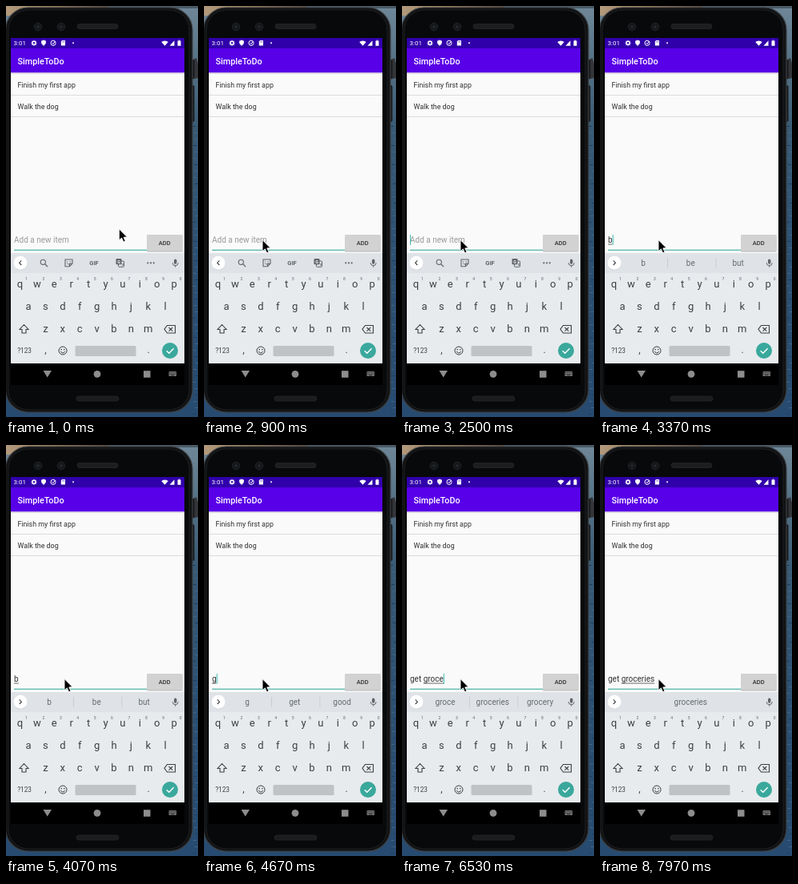
An HTML page with a canvas that plays this animation: 240 by 514 pixels, repeating every 8000 ms.

```html
<!DOCTYPE html>
<html lang="en">
<head>
<meta charset="utf-8">
<title>To-do list</title>
<style>
html, body { margin: 0; width: 100%; height: 100%; overflow: hidden; background: #08090a; }
canvas { display: block; width: 100vw; height: 100vh; }
</style>
</head>
<body>
<canvas id="stage"></canvas>
<script>
const W = 240, H = 514, LOOP = 8000;
const TEAL = '#3aa89c', INK = '#3c4043', GREY = '#60656a';
const canvas = document.getElementById('stage');
const c = canvas.getContext('2d');

// [time, text, composing start, suggestions]
const typing = [
  [0, '', 0, null],
  [3340, 'b', 0, ['b', 'be', 'but']],
  [4120, '', 0, null],
  [4640, 'g', 0, ['g', 'get', 'good']],
  [4870, 'ge', 0, ['ge', 'get', 'getting']],
  [5100, 'get', 0, ['get', 'getting', 'gets']],
  [5330, 'get ', 4, ['the', 'a', 'to']],
  [5570, 'get g', 4, ['g', 'going', 'good']],
  [5800, 'get gr', 4, ['gr', 'great', 'group']],
  [6030, 'get gro', 4, ['gro', 'group', 'grow']],
  [6270, 'get groc', 4, ['groc', 'grocery', 'groceries']],
  [6500, 'get groce', 4, ['groce', 'groceries', 'grocery']],
  [6740, 'get grocer', 4, ['grocer', 'grocery', 'groceries']],
  [6970, 'get groceri', 4, ['groceri', 'groceries', 'grocery']],
  [7200, 'get grocerie', 4, ['grocerie', 'groceries', 'grocery']],
  [7430, 'get groceries', 4, ['', 'groceries', '']]
];

function rect(x, y, w, h, fill) {
  c.fillStyle = fill;
  c.fillRect(x, y, w, h);
}
function round(x, y, w, h, r, fill, stroke, lw = 1) {
  c.beginPath();
  c.roundRect(x, y, w, h, r);
  paint(fill, stroke, lw);
}
function disc(x, y, r, fill, stroke, lw = 1) {
  c.beginPath();
  c.arc(x, y, r, 0, Math.PI * 2);
  paint(fill, stroke, lw);
}
function paint(fill, stroke, lw) {
  if (fill) { c.fillStyle = fill; c.fill(); }
  if (stroke) { c.strokeStyle = stroke; c.lineWidth = lw; c.stroke(); }
}
function shape(points, fill, stroke, lw = 1, open) {
  c.beginPath();
  points.forEach(([x, y], i) => i ? c.lineTo(x, y) : c.moveTo(x, y));
  if (!open) c.closePath();
  paint(fill, stroke, lw);
}
function text(s, x, y, size, fill, align = 'left', weight = 400) {
  c.font = `${weight} ${size}px Roboto, sans-serif`;
  c.textAlign = align;
  c.fillStyle = fill;
  c.fillText(s, x, y);
}
function fade(x0, y0, x1, y1, ...stops) {
  const g = c.createLinearGradient(x0, y0, x1, y1);
  stops.forEach(([p, col]) => g.addColorStop(p, col));
  return g;
}

function backdrop() {
  rect(0, 0, W, H, fade(0, 0, 0, H, [0, '#6f8798'], [.12, '#587487'], [.3, '#395a74'], [.6, '#2d5173'], [1, '#274b70']));
  rect(0, 0, 128, 12, fade(0, 0, 128, 0, [0, '#b39a7c'], [.5, '#92765a'], [1, '#594c42']));
  rect(128, 0, 112, 3, '#4a5a66');
  shape([[232, 68], [238, 65], [240, 72], [240, 90], [232, 92]], '#343539');
  // ripples
  for (let i = 0; i < 46; i++) {
    const y = 150 + i * 8, x = 233 + (i * 37 % 5);
    rect(x, y, 4, 1, i % 3 ? '#416685' : '#1c3d5e');
  }
}

function phone() {
  round(231, 67, 4.5, 24, 2, '#17181a');
  round(231, 99, 4.5, 46, 2, '#17181a');
  round(-.5, 2, 233.5, 506, 28, '#111214', '#3c3f42', 1.2);
  round(3, 5, 226, 500, 25, '#08090a', '#1d1f21', 1);
  disc(40, 26, 4.8, '#15171a', '#202327', 1);
  disc(40, 26, 1.8, '#25292e');
  disc(69, 26, 4.8, '#15171a', '#202327', 1);
  disc(69, 26, 1.8, '#25292e');
  round(89, 22.5, 51, 6, 3, '#1c1e20', '#292b2e', .7);
  round(88, 488, 53, 6, 3, '#1a1c1e', '#27292c', .7);
}

function statusBar() {
  rect(6, 40, 217, 13, '#3000aa');
  text('3:01', 9.5, 49.3, 8, '#fff');
  disc(35, 46.3, 2, null, '#fff', 1.5);
  for (let i = 0; i < 8; i++) {
    const a = i * Math.PI / 4;
    disc(35 + 3 * Math.cos(a), 46.3 + 3 * Math.sin(a), .6, '#fff');
  }
  shape([[47, 42.5], [50, 43.7], [49.7, 47], [47, 50], [44.3, 47], [44, 43.7]], '#fff');
  disc(59, 46.3, 3.1, null, '#fff', 1);
  shape([[57.5, 46], [59, 47.5], [61.5, 44]], null, '#fff', 1, true);
  shape([[70, 43], [74, 43], [74, 49.6], [68.8, 49.6], [68.8, 44.4]], '#fff');
  rect(70.5, 44, .7, 1.6, '#3000aa');
  rect(72, 44, .7, 1.6, '#3000aa');
  disc(84, 46.3, 1, '#fff');
  c.beginPath();
  c.moveTo(198.5, 49.8);
  c.arc(198.5, 49.8, 6.4, -2.3, -.84);
  paint('#fff');
  shape([[204.5, 49.7], [210.5, 49.7], [210.5, 43.3]], '#fff');
  rect(214.5, 43.5, 4, 6.3, '#fff');
  rect(215.7, 42.6, 1.6, 1, '#fff');
}

function app() {
  rect(6, 53, 217, 256, '#fafafa');
  rect(6, 53, 217, 30.5, '#5800e8');
  rect(6, 83.5, 217, 1.5, '#dddddf');
  text('SimpleToDo', 14.5, 72.5, 10.8, '#fff', 'left', 500);
  text('Finish my first app', 14.5, 101.5, 8.9, '#303030');
  text('Walk the dog', 14.5, 128.6, 8.9, '#303030');
  rect(6, 111, 217, 1, '#dcdcdc');
  rect(6, 138, 217, 1, '#dcdcdc');
  rect(10, 304.7, 166, 1.1, TEAL);
  round(176, 287, 44.5, 20.5, 1, '#b9b9b9');
  round(176, 286, 44.5, 20.5, 1, '#d2d2d2');
  text('ADD', 198.3, 299, 7.6, '#303030', 'center', 500);
}

function field(t, [since, value, from]) {
  text(value || 'Add a new item', 10, 296, 10, value ? '#333' : '#999');
  const end = 10 + (value ? c.measureText(value).width : 0);
  if (value) {
    const x = 10 + c.measureText(value.slice(0, from)).width;
    if (end > x + 1) rect(x, 297.6, end - x, .8, '#444');
  }
  const on = value ? (t - since) % 1000 < 500 : t % 1000 >= 400 && t % 1000 < 900;
  if (!on) return;
  if (value.length === 1) rect(end - .3, 286, 2, 12.5, '#8ed6d0');
  else rect(end, 286, 1.1, 13, '#4dbcb2');
}

function mic() {
  round(210, 316.5, 3.4, 6.2, 1.7, GREY);
  c.beginPath();
  c.arc(211.7, 321.2, 3.5, 0, Math.PI);
  paint(null, GREY, 1);
  rect(211.2, 324.5, 1, 2.2, GREY);
}

function toolIcons() {
  disc(46.3, 320.3, 3.1, null, GREY, 1.1);
  shape([[48.6, 322.6], [52, 326]], null, GREY, 1.3, true);
  shape([[74, 317], [83, 317], [83, 322], [79.5, 325.7], [74, 325.7]], null, GREY, 1.1);
  shape([[79.5, 325.7], [79.5, 322.2], [83, 322.2]], null, GREY, 1, true);
  disc(76.8, 319.7, .6, GREY);
  disc(80.2, 319.7, .6, GREY);
  c.beginPath();
  c.arc(78.3, 321, 2, .2, 2.9);
  paint(null, GREY, .9);
  text('GIF', 110, 324.2, 7.6, GREY, 'center', 700);
  round(140.5, 319, 7, 7.3, 1, '#dfe3e7', GREY, 1);
  round(137.5, 316, 7, 7.3, 1, GREY);
  text('G', 141, 321.9, 5.4, '#fff', 'center', 700);
  text('x', 145.8, 325.2, 4.5, GREY, 'center', 500);
  for (const x of [177.3, 181, 184.7]) disc(x, 321.3, 1.1, GREY);
}

function strip(words) {
  rect(6, 309, 217, 25, '#dfe3e7');
  disc(18, 321.8, 8.8, '#cfd3d7');
  disc(18, 321.2, 8.5, '#fff');
  const d = words ? 1 : -1;
  shape([[18 - 1.3 * d, 318.4], [18 + 1.4 * d, 321.2], [18 - 1.3 * d, 324]], null, INK, 1.1, true);
  mic();
  if (!words) return toolIcons();
  words.forEach((w, i) => text(w, 54 + i * 59.3, 324.8, 10, '#666b70', 'center'));
  if (words[0]) {
    rect(84, 315, .8, 13, '#c5c9cd');
    rect(144.5, 315, .8, 13, '#c5c9cd');
  }
}

function keyRow(letters, x, y) {
  [...letters].forEach((k, i) => text(k, x + i * 21.4, y, 13, INK, 'center'));
}

function keyboard() {
  rect(6, 334, 217, 113, '#e7ebee');
  keyRow('qwertyuiop', 17.5, 352.3);
  [...'1234567890'].forEach((k, i) => text(k, 25.5 + i * 21.4, 343, 5, GREY, 'center'));
  keyRow('asdfghjkl', 28, 380);
  keyRow('zxcvbnm', 49.4, 408);
  shape([[22.5, 398.5], [28, 404.5], [25, 404.5], [25, 409], [20, 409], [20, 404.5], [17, 404.5]], null, INK, 1.1);
  shape([[198, 404.2], [201.5, 399.5], [211.5, 399.5], [211.5, 409], [201.5, 409]], null, INK, 1.1);
  shape([[203.5, 402], [208.3, 406.7]], null, INK, 1.1, true);
  shape([[208.3, 402], [203.5, 406.7]], null, INK, 1.1, true);
  text('?123', 23, 434, 8.2, INK, 'center');
  text(',', 49.4, 434, 12, INK, 'center');
  disc(71, 431, 5, null, INK, 1);
  disc(69.2, 429.6, .8, INK);
  disc(72.8, 429.6, .8, INK);
  c.beginPath();
  c.arc(71, 431.3, 2.6, .2, 2.94);
  paint(null, INK, 1);
  round(86.5, 425, 76, 13, 1.5, '#bfc3c6');
  text('.', 178, 434, 12, INK, 'center');
  disc(205, 431, 10, TEAL);
  shape([[200.7, 431.2], [203.8, 434.2], [209.6, 428.2]], null, '#fff', 1.4, true);
}

function navBar() {
  rect(6, 447, 217, 27, '#000');
  const g = '#8d8d8d';
  shape([[46.5, 456], [57, 456], [51.7, 464.5]], g);
  disc(114, 460.3, 4.4, g);
  rect(172, 456.2, 8.5, 8.5, g);
  round(203.5, 457, 9.5, 6, 1, '#777');
  for (let i = 0; i < 8; i++) rect(204.5 + i % 4 * 2.1, 458.2 + (i >> 2) * 1.7, 1, .8, '#000');
  rect(206, 461.6, 4.5, .7, '#000');
}

function pointer(t) {
  const p = Math.min(1, Math.max(0, (t - 60) / 740));
  const e = p * p * (3 - 2 * p);
  c.save();
  c.translate(141.3 - 68.3 * e, 278.8 + 13.7 * e);
  shape([[0, 0], [0, 14.3], [3.3, 11.3], [5.5, 16.3], [8, 15.2], [5.8, 10.4], [10.2, 10.2]], '#000', '#fff', .9);
  c.restore();
}

function draw(now) {
  const t = now % LOOP;
  const w = innerWidth || W, h = innerHeight || H, ratio = devicePixelRatio || 1;
  const pw = Math.round(w * ratio), ph = Math.round(h * ratio);
  if (canvas.width !== pw || canvas.height !== ph) {
    canvas.width = pw;
    canvas.height = ph;
  }
  c.setTransform(pw / W, 0, 0, ph / H, 0, 0);
  const state = typing.findLast(s => s[0] <= t);
  backdrop();
  phone();
  statusBar();
  app();
  field(t, state);
  strip(state[3]);
  keyboard();
  navBar();
  pointer(t);
}

const start = performance.now();
function loop() {
  draw(performance.now() - start);
  requestAnimationFrame(loop);
}
loop();
</script>
</body>
</html>
```
